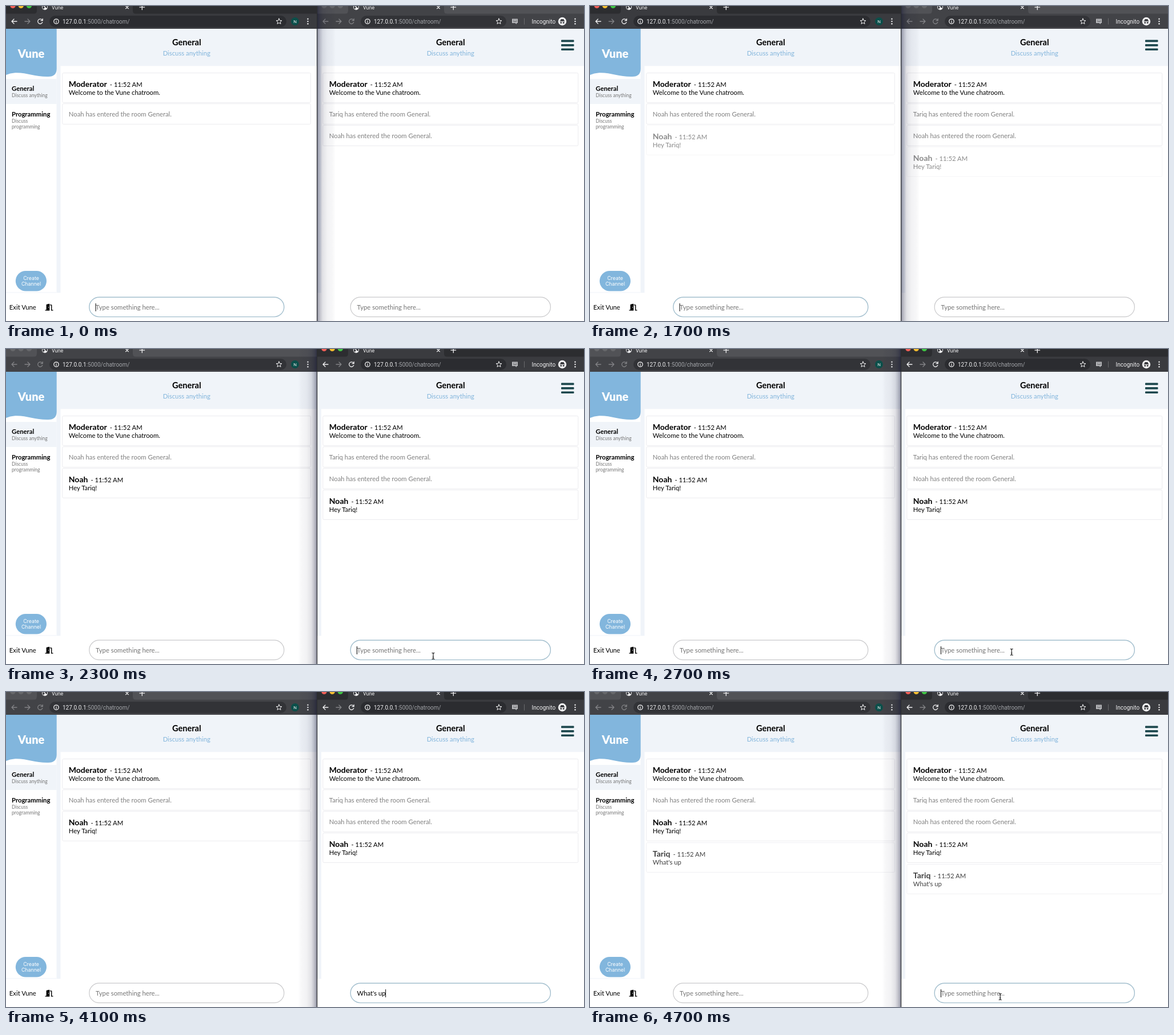
An HTML page for the animation above (4800 ms loop, 1012 px wide and 553 px high).

```html
<!DOCTYPE html>
<html lang="en">
<head>
<meta charset="utf-8">
<title>Chatroom</title>
<style>
  html, body { margin: 0; width: 100%; height: 100%; overflow: hidden; background: #fff; }
  svg { display: block; width: 1012px; height: 553px; }
  text { font: 11.3px Lato, sans-serif; white-space: pre; }
  .bold { font-weight: 700; }
  .name { font-size: 14px; font-weight: 700; }
  .time { font-size: 11.3px; font-weight: 400; }
  .title { font-size: 14.6px; font-weight: 700; text-anchor: middle; }
  .sub { fill: #82b5dc; text-anchor: middle; }
  .small { font-size: 8.5px; fill: #777; }
  .logo { font-size: 20px; font-weight: 900; fill: #fff; text-anchor: middle; }
  .button { font: 8.8px Inter, sans-serif; fill: #fff; text-anchor: middle; }
  .ui { font: 10px Roboto, sans-serif; fill: #f1f1f2; }
  .tab { font-size: 9px; }
  .avatar { font-size: 8px; text-anchor: middle; }
  .dim { fill: #a2a4a8; }
  .notice { fill: #808080; }
  .page { fill: #fff; }
  .card { fill: #fff; stroke: #ececef; }
  .pale { fill: #f0f4f9; }
  .blue { fill: #82b6dd; }
  .teal { fill: #1c474d; }
  .line { fill: none; stroke: #f1f1f2; stroke-width: 1.3; stroke-linecap: round; stroke-linejoin: round; }
  .frame { fill: #2c2d30; }
  .bar { fill: #3a3b3f; }
  .url { fill: #2b2c30; }
  .field { fill: #fff; stroke: #c9c9cb; stroke-width: 1.2; }
  .on .field { stroke: #a3bfce; stroke-width: 1.4; }
  .off .frame { fill: #515256; }
  .off .bar { fill: #424347; }
  .off .url { fill: #323337; }
  .off .light { fill: #66676a; }
  .off .nav, .line.faded { stroke: #828386; }
  .on .shade { display: none; }
</style>
</head>
<body>
<svg id="stage" viewBox="0 0 1012 553" xmlns="http://www.w3.org/2000/svg"></svg>
<script>
const LOOP = 4800, STEP = 100, FADE = 550;
const APP = 'Vune', LEFT_USER = 'Noah', RIGHT_USER = 'Tariq';
const HINT = 'Type something here...';
const stage = document.getElementById('stage');

const rect = (x, y, w, h, cls = '', rx = 0) =>
  `<rect x="${x}" y="${y}" width="${w}" height="${h}" rx="${rx}" class="${cls}"/>`;
const text = (x, y, str, cls = '') => `<text x="${x}" y="${y}" class="${cls}">${str}</text>`;
const path = (d, cls = 'line') => `<path d="${d}" class="${cls}"/>`;
const dot = (x, y, r, fill, cls = '') =>
  `<circle cx="${x}" cy="${y}" r="${r}" fill="${fill}" class="${cls}"/>`;

function star(cx, cy) {
  const pts = Array.from({ length: 10 }, (_, i) => {
    const r = i % 2 ? 2.3 : 5.2, a = (i / 5 - 0.5) * Math.PI;
    return `${(cx + r * Math.cos(a)).toFixed(2)},${(cy + r * Math.sin(a)).toFixed(2)}`;
  });
  return `<polygon points="${pts.join(' ')}" class="line" style="stroke-width:1"/>`;
}

function chrome(x, w, starX, menuX) {
  const lights = ['#f25f57', '#f6bd2f', '#3fc544']
    .map((c, i) => dot(x + 12 + 14.2 * i, -0.6, 4.6, c, 'light')).join('');
  return rect(x, 0, w, 16, 'frame') + lights +
    rect(x, 13.5, w, 26.5, 'bar') +
    path(`M${x + 48} 14q6 0 6-6V0H${x + 222}V8q0 6 6 6z`, 'bar') +
    dot(x + 68, 2, 5, '#f1f1f2') +
    path(`M${x + 64} 0l3 1 1 2-2 1 1 2-3-2zM${x + 69} -1l3 1v4l-2-1-2-2z`, 'bar') +
    text(x + 80, 5.6, APP, 'ui tab') +
    path(`M${x + 209.6} -.2l4.8 4.8m0-4.8l-4.8 4.8`) +
    path(`M${x + 234} 2.2h8.6m-4.3-4.3v8.6`) +
    path(`M${x + 19} 27h-9m4-4l-4 4 4 4`, 'line nav') +
    path(`M${x + 33} 27h9m-4-4l4 4-4 4`, 'line faded') +
    path(`M${x + 63.6} 25a4.2 4.2 0 1 0 .2 3.6M${x + 64.2} 22.4v3.2h-3.2`, 'line nav') +
    rect(x + 76, 17, starX + 13 - x - 76, 20, 'url', 10) +
    path(`M${x + 83.8} 27a4.2 4.2 0 1 0 8.4 0a4.2 4.2 0 1 0-8.4 0M${x + 88} 26.8v2.2m0-4.2v.1`) +
    text(x + 99, 30.5, '127.0.0.1<tspan class="dim">:5000/chatroom/</tspan>', 'ui') +
    star(starX, 27.2) +
    [22.8, 27, 31.2].map(y => dot(menuX, y, 1.2, '#f1f1f2')).join('');
}

function post(x, y, w, who, words, id = '') {
  return `<g id="${id}">` + rect(x + 0.5, y + 0.5, w - 1, 52, 'card', 2) +
    text(x + 11.5, y + 25, `${who}<tspan dx="5" class="time">- 11:52 AM</tspan>`, 'name') +
    text(x + 11.5, y + 39.3, words) + '</g>';
}
const notice = (x, y, w, who) => rect(x + 0.5, y + 0.5, w - 1, 36, 'card', 2) +
  text(x + 11.5, y + 22.7, `${who} has entered the room General.`, 'notice');

const heading = x => text(x, 69, 'General', 'title') + text(x, 86.6, 'Discuss anything', 'sub');
const input = (x, w) => rect(x, 511.2, w, 34.4, 'field', 17.2) +
  `<text class="entry" x="${x + 11.3}" y="533"></text>` +
  '<rect class="caret" y="522" width="1" height="14"/>';
const shadow = (x, id) =>
  `<rect x="${x}" width="32" height="553" fill="url(#${id})" class="shade"/>`;

const door = path('M68.5 533.4h2.1v-8.6q0-.8.7-1l4.200-1q.8-.2.8.7v11.300h-7.800z' +
  'M76.900 524.200h2.500q1 0 1 1v8.200h2.100v1.400H79v-9.200h-2.100z', '') + dot(74.4, 529, 0.7, '#fff');

const sidebar = rect(0, 128, 88.5, 44, 'pale') +
  path('M0 40H88.700V110Q88.700 124 74 124C52 124.600 36 116.500 16 117.300Q7 118 0 121Z', 'blue') +
  text(44, 91, APP, 'logo') +
  text(10, 149, 'General', 'bold') + text(10, 159.8, 'Discuss anything', 'small') +
  text(10, 194, 'Programming', 'bold') + text(10, 204.8, 'Discuss', 'small') +
  text(10, 215.2, 'programming', 'small') +
  rect(16.8, 465, 54.2, 35.5, 'blue', 17.7) +
  text(44, 480.6, 'Create', 'button') + text(44, 491.4, 'Channel', 'button') +
  rect(0, 502.5, 88, 1, 'pale') + text(5.8, 533, `Exit ${APP}`) + door;

const L = { x: 98.3, w: 435.7 }, R = { x: 554.3, w: 448 };

const leftWin = '<g id="left">' + rect(0, 40, 544, 513, 'page') +
  rect(88.5, 40, 456, 65.3, 'pale') + rect(88.5, 105, 7, 398.5, 'pale') +
  chrome(0, 544, 478, 528.5) + dot(506, 27, 7, '#0c4f4a') +
  text(506, 30, LEFT_USER[0], 'ui avatar') +
  sidebar + heading(316.3) +
  post(L.x, 117, L.w, 'Moderator', `Welcome to the ${APP} chatroom.`) +
  notice(L.x, 171, L.w, LEFT_USER) +
  post(L.x, 209, L.w, LEFT_USER, `Hey ${RIGHT_USER}!`, 'l1') +
  post(L.x, 264, L.w, RIGHT_USER, "What's up", 'l2') +
  input(145.8, 341) + shadow(512, 'shadeL') + '</g>';

const rightWin = '<g id="right">' + rect(545, 40, 467, 513, 'page') +
  rect(545, 40, 467, 65.3, 'pale') + rect(545, 105, 7, 398.5, 'pale') +
  chrome(545, 467, 863, 996.5) +
  '<path d="M886 22.5h10V30h-2v2l-2.5-2H886z" fill="#b9babd"/>' +
  '<path d="M888 25h2.5m1.5 0h2.5M888 27.5h6.5" stroke="#55565a"/>' +
  '<path d="M907.5 21.5v11" stroke="#6a6b6e"/>' +
  text(920.5, 30.5, 'Incognito', 'ui') +
  dot(974, 27, 7.2, '#f4f4f5') +
  path('M971.5 23h5l1 3h-7zM969.5 26h9v1h-9z', 'bar') +
  dot(971.8, 29.3, 1.5, '', 'bar') + dot(976.2, 29.3, 1.5, '', 'bar') +
  heading(778.3) +
  [59.6, 67, 74.4].map(y => rect(972, y, 22.5, 3.7, 'teal', 1)).join('') +
  post(R.x, 117, R.w, 'Moderator', `Welcome to the ${APP} chatroom.`) +
  notice(R.x, 171, R.w, RIGHT_USER) + notice(R.x, 209, R.w, LEFT_USER) +
  post(R.x, 247, R.w, LEFT_USER, `Hey ${RIGHT_USER}!`, 'r1') +
  post(R.x, 302, R.w, RIGHT_USER, "What's up", 'r2') +
  input(603.2, 350.2) + shadow(545, 'shadeR') + '</g>';

const shade = (id, from, to) => `<linearGradient id="${id}" x1="${from}" x2="${to}">` +
  [[0, 0.46], [0.12, 0.27], [0.3, 0.12], [0.55, 0.055], [0.85, 0.03], [1, 0]]
    .map(([o, a]) => `<stop offset="${o}" stop-color="#0c0e30" stop-opacity="${a}"/>`).join('') +
  '</linearGradient>';

const pointers =
  '<path id="arrow" d="M0 0v10l2.3-2 1.6 3.6 1.8-.8-1.6-3.5h3z" stroke="#fff" stroke-width=".8"/>' +
  '<path id="beam" d="M-2.5-5.5q2.5 0 2.5 1.5V4q0 1.5-2.5 1.5M2.5-5.5Q0-5.5 0-4M0 4q0 1.5 2.5 1.5M-1.3 2h2.6"' +
  ' fill="none" stroke="#222" stroke-width="1.2"/>';

stage.innerHTML = '<defs>' + shade('shadeL', 1, 0) + shade('shadeR', 0, 1) + '</defs>' +
  leftWin + rightWin + rect(544, 0, 1.2, 553, 'frame') + pointers;

const el = id => document.getElementById(id);

// One time per typed character; the text is cleared when sent.
const typing = {
  left: { words: `Hey ${RIGHT_USER}!`, keys: [200, 300, 400, 500, 700, 800, 900, 1000, 1100, 1300], sent: 1400 },
  right: { words: "What's up", keys: [2900, 3000, 3100, 3200, 3400, 3500, 3600, 3800, 3900], sent: 4200 }
};
const posts = { l1: 1450, r1: 1450, l2: 4290, r2: 4290 };
const SWITCH = 2300;
const moves = [
  [2100, 'arrow', 752, 547], [2200, 'arrow', 749.3, 540.5], [2300, 'beam', 748, 539],
  [2500, 'beam', 742, 535], [2600, 'beam', 738.2, 532], [2900, ''], [4700, 'beam', 718.2, 535]
];

function drawInput(id, t, active) {
  const { words, keys, sent } = typing[id];
  const typed = t < sent ? words.slice(0, keys.filter(k => k <= t).length) : '';
  const entry = el(id).querySelector('.entry'), caret = el(id).querySelector('.caret');
  entry.textContent = typed || HINT;
  entry.setAttribute('fill', typed ? '#000' : '#757575');
  const end = typed ? entry.getComputedTextLength() : 0;
  caret.setAttribute('x', +entry.getAttribute('x') + end - 0.5);
  const blinkOff = t >= sent + 500 && t < SWITCH;
  caret.style.display = active && !blinkOff ? '' : 'none';
  el(id).setAttribute('class', active ? 'on' : 'off');
}

function draw(t) {
  drawInput('left', t, t < SWITCH);
  drawInput('right', t, t >= SWITCH);
  for (const id in posts)
    el(id).setAttribute('opacity', Math.min(1, Math.max(0, (t - posts[id]) / FADE)));
  const [, kind, x, y] = moves.filter(m => m[0] <= t).pop() || [0, ''];
  for (const id of ['arrow', 'beam']) {
    el(id).style.display = id === kind ? '' : 'none';
    if (id === kind) el(id).setAttribute('transform', `translate(${x} ${y})`);
  }
}

const start = performance.now();
function tick() {
  const t = (performance.now() - start) % LOOP;
  draw(Math.floor(t / STEP) * STEP);
  requestAnimationFrame(tick);
}
tick();
</script>
</body>
</html>
```
